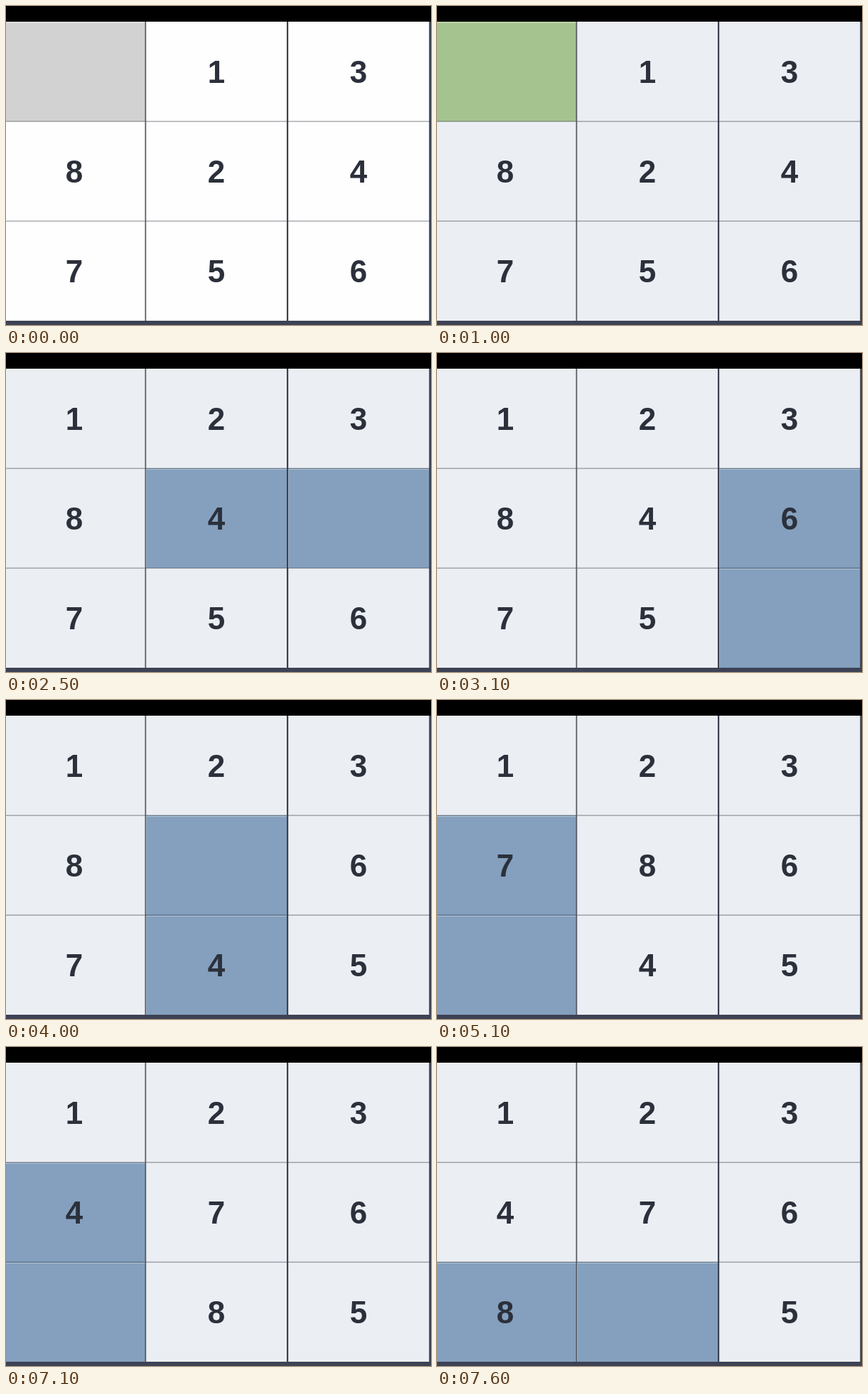
Write an HTML page with a canvas that moves like this. It is 598 px wide and 448 px high and loops after 8 s.

```html
<!DOCTYPE html>
<html lang="en">
<head>
<meta charset="utf-8">
<title>Sliding puzzle</title>
<style>
html, body { margin: 0; width: 100%; height: 100%; overflow: hidden; background: #000; }
canvas { display: block; }
</style>
</head>
<body>
<canvas id="stage" width="598" height="448"></canvas>
<script>
const ctx = document.getElementById('stage').getContext('2d');
const LOOP = 8000, START = 1000, STEP = 500;
const BOARD = [0, 1, 3, 8, 2, 4, 7, 5, 6];
// Where the empty cell goes, one stop per step
const PATH = [0, 1, 4, 5, 8, 7, 4, 3, 6, 7, 4, 3, 6, 7];
const TOP = 22, CELL_W = 200, CELL_H = 140;

// The later steps run slightly behind the beat
const stepTime = k => START + k * STEP + (k >= 8 ? 100 : 0);

function stateAt(time) {
  const board = BOARD.slice();
  let step = -1;
  while (step + 1 < PATH.length && time >= stepTime(step + 1)) {
    step++;
    if (step > 0) {
      board[PATH[step - 1]] = board[PATH[step]];
      board[PATH[step]] = 0;
    }
  }
  return { board, step };
}

function rect(color, x, y, w, h) {
  ctx.fillStyle = color;
  ctx.fillRect(x, y, w, h);
}

function fillCell(i, color) {
  const col = i % 3, row = Math.floor(i / 3);
  const x = col ? col * CELL_W - 3 : 0;
  const y = TOP + row * CELL_H;
  const right = col * CELL_W + 196;
  rect(color, x, y, right - x, CELL_H);
  const glint = 'rgba(255,255,255,0.4)';
  rect(glint, x, y + 1, right - x, 1);
  if (col) rect(glint, x, y + 1, 1, CELL_H - 1);
}

function drawGrid() {
  const thin = 'rgba(45,50,62,0.5)', dark = '#3b4050';
  for (const y of [162, 302]) rect(thin, 0, y - 0.5, 596, 1.2);
  rect('#555861', 195.5, TOP, 1.7, 420);
  rect(dark, 395, TOP, 2.2, 420);
  rect(dark, 595.3, TOP, 2.7, 420);
  rect('#3d4254', 0, 442, 598, 6);
  rect('#000', 0, 0, 598, TOP);
}

function drawDigits(board) {
  ctx.fillStyle = '#2b303b';
  ctx.font = 'bold 44px "Liberation Sans", Arial, sans-serif';
  ctx.textAlign = 'center';
  ctx.textBaseline = 'alphabetic';
  board.forEach((n, i) => {
    if (n) ctx.fillText(n, 96 + i % 3 * CELL_W, 108 + Math.floor(i / 3) * CELL_H);
  });
}

function draw(time) {
  const { board, step } = stateAt(time);
  rect(step < 0 ? '#fefefe' : '#ebeef3', 0, 0, 598, 448);
  if (step < 0) fillCell(0, '#d2d2d2');
  else if (step === 0) fillCell(0, '#a5c38e');
  else [PATH[step - 1], PATH[step]].forEach(i => fillCell(i, '#84a0be'));
  drawGrid();
  drawDigits(board);
}

const begin = performance.now();
function tick() {
  draw((performance.now() - begin) % LOOP);
  requestAnimationFrame(tick);
}
tick();
</script>
</body>
</html>
```
